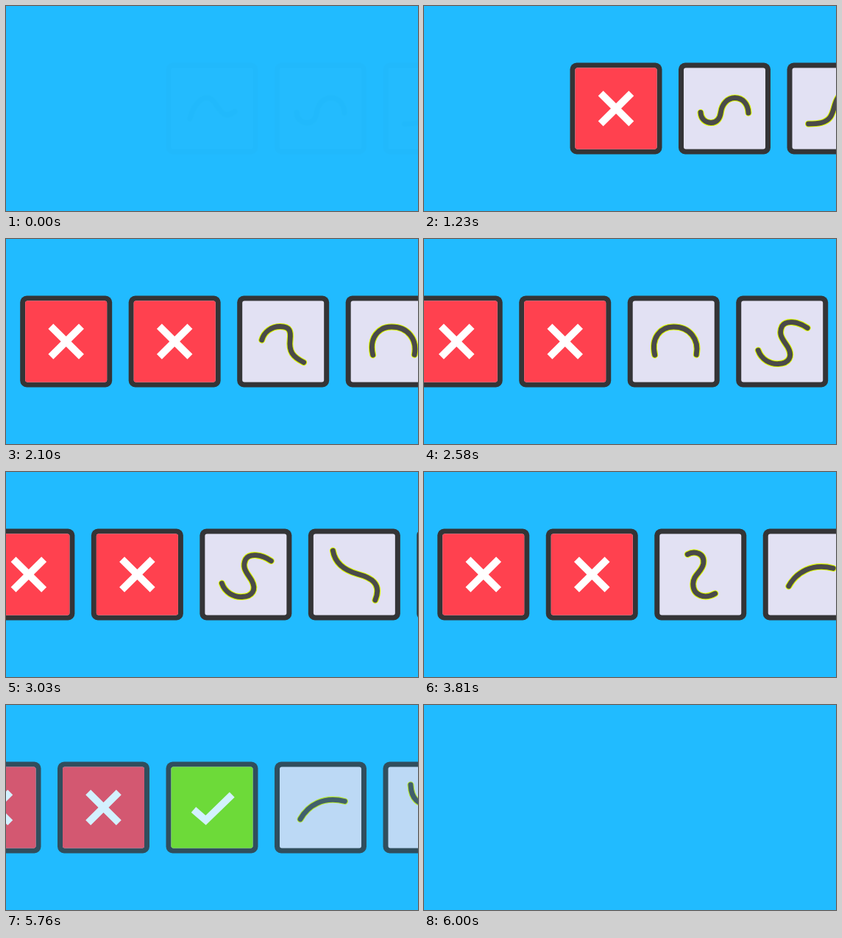
Animation of 560x280 px, one loop 6.3 s. Source, as an HTML page:

```html
<!DOCTYPE html>
<html lang="en">
<head>
<meta charset="utf-8">
<title>Gesture tiles</title>
<style>
  html, body { margin: 0; width: 100%; height: 100%; overflow: hidden; background: #21bbff; }
  svg { display: block; width: 560px; height: 280px; }
  path { fill: none; }
  .frame { fill: #343436; }
  .face { fill: #e2e1f3; }
  .glow, .ink { stroke-linecap: round; stroke-linejoin: round; }
  .glow { stroke: #d9f400; stroke-width: 9; }
  .ink { stroke: #4a4a48; stroke-width: 6.8; }
  .no { fill: #ff414f; }
  .yes { fill: #80e20a; }
  .mark { stroke: #fff; stroke-width: 9.8; }
</style>
</head>
<body>
<svg viewBox="0 0 560 280"><g id="row"></g></svg>
<script>
  const LOOP = 6300, PITCH = 147.5, GOOD = 7;
  const MOVE = 300, FLASH = 100;
  const CROSS = 'M-20.8-20.8L20.8 20.8M20.8-20.8L-20.8 20.8';
  const TICK = 'M-25 3L-8.5 17.4L27.3-17.6';

  // Strokes drawn around the tile centre
  const strokes = [
    'M-30 14C-24-10-8-22 2-10C11 2 16 16 31 4',
    'M-32.5 5.5C-32 14-26 19.5-18.5 19.5C-10 19.5-6 13-5 5C-3.5-6 4-14.5 14-14.5C25-14.5 32-6 32.5 6',
    'M-33.5 21C-20 21-10 20-4 12C4 1 0-18 18-22C24-23 29-22 33-20',
    'M-29-2C-26-13-16-20.5-4-20.5C10-20.5 10.5-13 9.5-3C7.5 14 13 21 28 28.5',
    'M-25.5 18.5C-31-5-18-20 0-20C22-20 35-3 31 18',
    'M-32.5 12C-28 25-16 31-5 30.5C9 30 15 21 8 8C2-2-6-9 0-21C5-29 21-28 34.5-18.5',
    'M-29-32.5C-26-14-11-5 5-.5C22 4 38 12 28.5 35',
    'M-17.5-27.5C-8-33 6-29 4-15C2-3-10 0-10 13C-10 29 6 34 20 26',
    'M-27.5 16C-17-3 4-16 33-8.5',
    'M-25-31C-24-10-14-5 0-3C14 0 22 12 24 30'
  ];

  const row = document.getElementById('row');
  const box = (cls, half, r) =>
    `<rect class="${cls}" x="${-half}" y="${-half}" width="${half * 2}" height="${half * 2}" rx="${r}"/>`;

  row.innerHTML = strokes.map((d, i) => `
    <g transform="translate(${i * PITCH})">
      ${box('frame', 62.5, 9)}${box('face', 55.5, 3)}
      <path class="glow" d="${d}"/><path class="ink" d="${d}"/>
      <g class="result" opacity="0">
        ${box(i === GOOD ? 'yes' : 'no', 55.5, 3)}
        <path class="mark" d="${i === GOOD ? TICK : CROSS}"/>
      </g>
    </g>`).join('');
  const results = [...row.querySelectorAll('.result')];

  const easeOut = (t, start, span) => {
    const x = Math.min(1, Math.max(0, (t - start) / span));
    return x * (2 - x);
  };
  const moveAt = k => k ? 1189.5 + 427.2 * k : 1211;
  const flashAt = k => k === 0 ? 860 : k === GOOD ? 4370 : moveAt(k) - 115;

  function draw(now) {
    const t = now % LOOP;
    let steps = 0;
    for (let k = 0; k < GOOD; k++) steps += easeOut(t, moveAt(k), MOVE);
    row.setAttribute('transform', `translate(${280 - steps * PITCH} 140)`);
    row.setAttribute('opacity', t < 6000 ? easeOut(t, 0, 300) - easeOut(t, 5730, 300) : 0);
    results.forEach((el, i) =>
      el.setAttribute('opacity', i > GOOD ? 0 : easeOut(t, flashAt(i), FLASH)));
  }

  const origin = performance.now();
  function tick() {
    draw(performance.now() - origin);
    requestAnimationFrame(tick);
  }
  tick();
</script>
</body>
</html>
```
